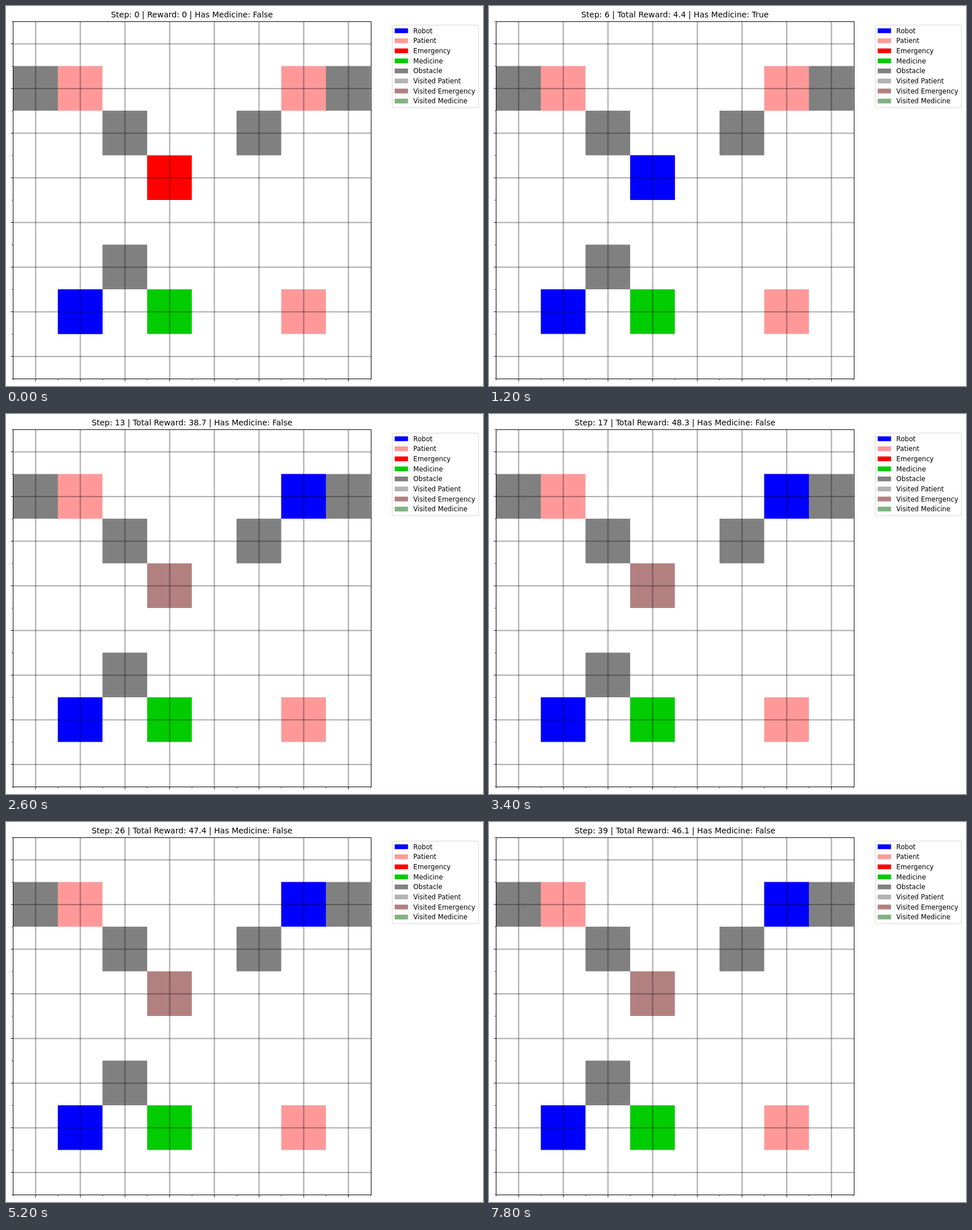
Animation, 838 px wide and 668 px high, one loop 8000 ms. Source, as an HTML page:

```html
<!DOCTYPE html>
<html lang="en">
<head>
<meta charset="utf-8">
<title>Medicine delivery grid</title>
<style>
  html, body { margin: 0; width: 100%; height: 100%; overflow: hidden; background: #fff; }
  svg { display: block; }
  text { font-family: "DejaVu Sans", sans-serif; fill: #000; white-space: pre; }
  .title { font-size: 13.97px; text-anchor: middle; }
  .legend { font-size: 11.65px; }
  .grid { stroke: #000; stroke-opacity: .3; stroke-width: 2.33; }
  .major { stroke: #000; stroke-width: .93; }
  .minor { stroke: #000; stroke-width: .7; }
</style>
</head>
<body>
<svg id="stage" width="838" height="668" viewBox="0 0 838 668"></svg>
<script>
const stage = document.getElementById('stage');
const SIZE = 8, CELL = 78.5, LEFT = 12.5, TOP = 27;
const STEP_MS = 200, STEPS = 40;
const COLORS = {
  'Robot': '#0000ff', 'Patient': '#ff9999', 'Emergency': '#ff0000', 'Medicine': '#00cc00',
  'Obstacle': '#808080', 'Visited Patient': '#b3b3b3', 'Visited Emergency': '#b38080',
  'Visited Medicine': '#80b380'
};

function add(tag, attrs, text) {
  const node = document.createElementNS('http://www.w3.org/2000/svg', tag);
  for (const key in attrs) node.setAttribute(key, attrs[key]);
  if (text) node.textContent = text;
  return stage.appendChild(node);
}
const line = (cls, x1, y1, x2, y2) => add('line', { class: cls, x1, y1, x2, y2 });

function place(node, [row, col]) {
  node.setAttribute('x', LEFT + col * CELL);
  node.setAttribute('y', TOP + row * CELL);
}
function addCell(kind, row, col) {
  const node = add('rect', { width: CELL, height: CELL, fill: COLORS[kind] });
  place(node, [row, col]);
  return node;
}

for (const [row, col] of [[1, 0], [1, 7], [2, 2], [2, 5], [5, 2]]) addCell('Obstacle', row, col);
for (const [row, col] of [[1, 1], [1, 6], [6, 6]]) addCell('Patient', row, col);
addCell('Medicine', 6, 3);
addCell('Robot', 6, 1);
const emergency = addCell('Emergency', 3, 3);
const robot = addCell('Robot', 6, 1);

// Grid, ticks and frame
for (let i = 0; i <= SIZE; i++) {
  const edgeX = LEFT + .3 + i * CELL, edgeY = TOP + .3 + i * CELL;
  line('minor', edgeX, 655.5, edgeX, 658);
  line('minor', 10, edgeY, 12.5, edgeY);
  if (i === SIZE) break;
  const midX = edgeX + CELL / 2, midY = edgeY + CELL / 2;
  line('grid', midX, 27, midX, 655.5);
  line('grid', 12.5, midY, 641, midY);
  line('major', midX, 655.5, midX, 660);
  line('major', 8.4, midY, 12.5, midY);
}
add('rect', { x: 12.5, y: 27.5, width: 629, height: 628, fill: 'none', stroke: '#000' });

// Legend
add('rect', { x: 678.5, y: 33.5, width: 151.5, height: 145.5, rx: 2.3, fill: '#fff', stroke: '#d6d6d6' });
Object.entries(COLORS).forEach(([label, fill], i) => {
  const y = 43.5 + i * 17.66;
  add('rect', { x: 682.8, y: y - 4.2, width: 23.5, height: 8.4, fill });
  add('text', { class: 'legend', x: 715.6, y: y + 4.2 }, label);
});

const title = add('text', { class: 'title', x: 326.7, y: 20.3 });

// Moves per step: R right, U up, '.' stays in place for an action
const MOVES = 'RR.UUU..RUURR'.replace('RUURR', 'URURR');
const BONUS = { 3: 5, 7: 20, 8: 15, 14: 10 };

function stateAt(step) {
  let row = 6, col = 1, reward = 0;
  for (let i = 1; i <= step; i++) {
    const move = MOVES[i - 1];
    if (move === 'R') col++;
    if (move === 'U') row--;
    reward += (BONUS[i] || 0) - .1;
  }
  return { cell: [row, col], reward, hasMedicine: step >= 3 && step < 8 };
}

let shown = -1;
function draw() {
  const step = Math.floor(performance.now() / STEP_MS) % STEPS;
  if (step !== shown) {
    shown = step;
    const { cell, reward, hasMedicine } = stateAt(step);
    place(robot, cell);
    emergency.setAttribute('fill', COLORS[step < 8 ? 'Emergency' : 'Visited Emergency']);
    const score = step ? `Total Reward: ${reward.toFixed(1)}` : 'Reward: 0';
    title.textContent = `Step: ${step} | ${score} | Has Medicine: ${hasMedicine ? 'True' : 'False'}`;
  }
  requestAnimationFrame(draw);
}
draw();
</script>
</body>
</html>
```
